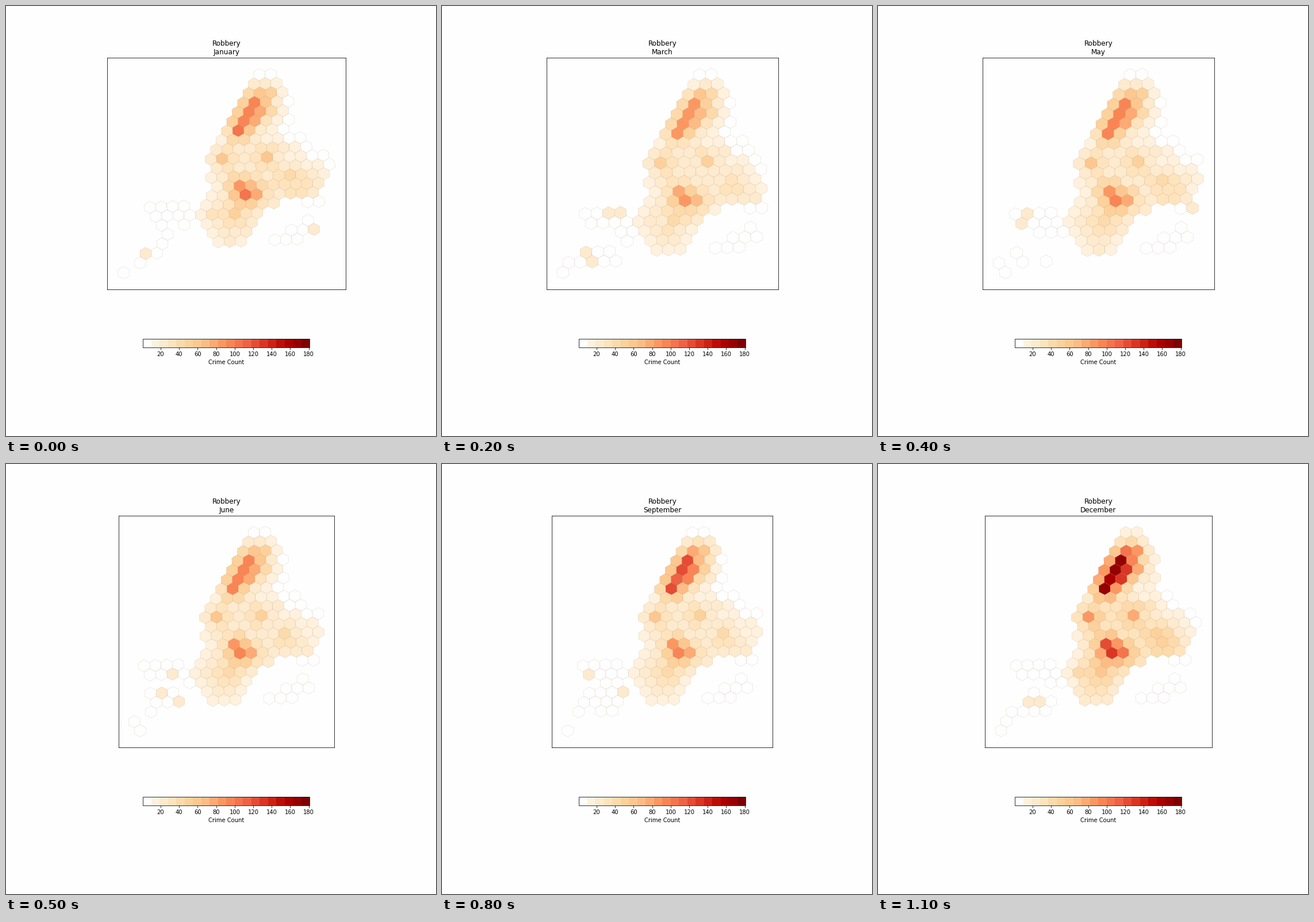
A matplotlib script that plays this animation: 748x748 px, repeating every 1200 ms.

```python
import random

import matplotlib.pyplot as plt
import numpy as np
from matplotlib.animation import FuncAnimation
from matplotlib.collections import PolyCollection
from matplotlib.colors import ListedColormap, Normalize

BG = "#fefefe"
QUIET = 5  # count of a cell away from every hill

# Skewed hexagonal lattice: one step along a row, one step down a row
EAST = np.array([19.55, -0.67])
DOWN = np.array([-9.37, 16.32])
DIAG = EAST + DOWN
HALF = np.array([EAST + DIAG, DIAG + DOWN, DOWN - EAST]) / 3
HEXAGON = np.vstack([HALF, -HALF])

# Hills of the count surface: row, column, height, width in cells
NORTH = [
    (2, 1, 25, 0.6), (2, 2, 30, 0.6), (3, 1, 60, 0.6), (4, 1, 35, 0.6),
    (4, 2, 18, 0.6), (4, 3, 25, 0.6), (5, 1, 36, 0.6), (5, 2, 33, 0.6),
    (6, 1, 72, 0.6), (4, 0, 15, 0.8), (3.5, 1.5, 10, 1.8),
]
SOUTH = [
    (9, 1, 45, 0.6), (9, 5, 36, 0.6), (8, 1.5, 14, 1.4), (8, 4, 12, 1),
    (8, 6, 16, 0.5), (12, 4, 45, 0.6), (13, 5, 45, 0.6), (13, 6, 38, 0.6),
    (12.8, 4.7, 28, 1.9), (15, 5, 18, 0.7), (15, 3, 14, 0.6),
    (17, 5.5, 16, 1.3), (12, 8.7, 23, 1.6), (11, 8, 14, 0.6),
    (12.5, 10.5, 9, 1),
]

# Name, strength in north and south, eastern limit, south-western tip
YEAR = [
    ("January", 1.0, 1.0, 562, [(20, -1), (21, -2)]),
    ("February", 0.95, 0.9, 553, [(21, -1)]),
    ("March", 0.9, 0.8, 544, [(19, -2), (20, -2)]),
    ("April", 0.95, 0.85, 553, [(20, -1)]),
    ("May", 1.0, 0.95, 553, [(19, -2), (20, -1)]),
    ("June", 1.0, 0.9, 552, [(20, -1), (21, 0)]),
    ("July", 1.2, 0.9, 552, [(21, -1)]),
    ("August", 1.35, 0.9, 553, [(20, 0), (21, -2)]),
    ("September", 1.25, 0.9, 553, [(21, -1)]),
    ("October", 1.15, 0.95, 562, [(20, -1), (21, -1)]),
    ("November", 1.4, 1.1, 562, [(21, -1)]),
    ("December", 1.75, 1.35, 562, [(20, -1), (21, -1)]),
]


def center(row, col):
    return np.array([440, 119.5]) + col * EAST + row * DOWN


def surface(row, col, hills):
    total = 0
    for r, c, height, width in hills:
        dist = np.linalg.norm(center(row, col) - center(r, c)) / EAST[0]
        total += height * np.exp(-dist**2 / (2 * width**2))
    return total


def mainland():
    """Cells between the western and eastern shore lines."""
    for row in range(19):
        west = round(np.interp(row, [9, 12, 15, 18], [0, 2, 2, 5]))
        east = round(np.interp(row, [0, 3, 6, 9, 10, 13, 14, 15],
                               [1, 4, 5, 10, 11, 11, 8, 7]))
        for col in range(west, east + 1):
            yield row, col


def islands(rng):
    """Sparse cells to the south-west and south-east."""
    for row in range(14, 20):
        first = min(row - 17, -1)
        for col in range(first, first + 4):
            if row < 16 or rng.random() < 0.6:
                yield row, col
    for row, first, last in [(14, 11, 12), (16, 12, 12), (17, 11, 13), (18, 10, 12)]:
        for col in range(first, last + 1):
            yield row, col


LAND = {cell: (surface(*cell, NORTH), surface(*cell, SOUTH)) for cell in mainland()}


def month_cells(k):
    _, north, south, limit, tip = YEAR[k]
    rng = random.Random(k)
    cells = {c: QUIET + north * n + south * s for c, (n, s) in LAND.items()
             if center(*c)[0] <= limit}
    for c in islands(rng):
        cells[c] = 20 if rng.random() < 0.12 else QUIET
    cells.update(dict.fromkeys(tip, QUIET))
    return cells


MONTHS = [month_cells(k) for k in range(len(YEAR))]

steps = plt.get_cmap("OrRd", 20)(np.arange(20))
steps[0] = plt.matplotlib.colors.to_rgba(BG)

fig, ax = plt.subplots(figsize=(10.389, 10.389), dpi=72, facecolor=BG)
ax.set(xticks=[], yticks=[], facecolor=BG, aspect="equal")
hexes = PolyCollection([], cmap=ListedColormap(steps), norm=Normalize(1, 181),
                       edgecolors="#8a6a40", linewidths=0.12)
ax.add_collection(hexes, autolim=False)
fig.colorbar(hexes, ax=ax, orientation="horizontal", shrink=0.5,
             label="Crime Count", ticks=range(20, 181, 20))


def draw(k):
    cells = MONTHS[k]
    verts = np.array([center(*c) + HEXAGON for c in cells])
    hexes.set_verts(verts)
    hexes.set_array(np.array(list(cells.values()), float))
    low, high = verts.min(axis=(0, 1)), verts.max(axis=(0, 1))
    pad = 0.05 * (high - low)
    ax.set_xlim(low[0] - pad[0], high[0] + pad[0])
    ax.set_ylim(high[1] + pad[1], low[1] - pad[1])
    ax.set_title(f"Robbery\n{YEAR[k][0]}")
    return [hexes]


anim = FuncAnimation(fig, draw, frames=len(YEAR), interval=100,
                     repeat=True, repeat_delay=0, blit=False)
plt.show()
```
